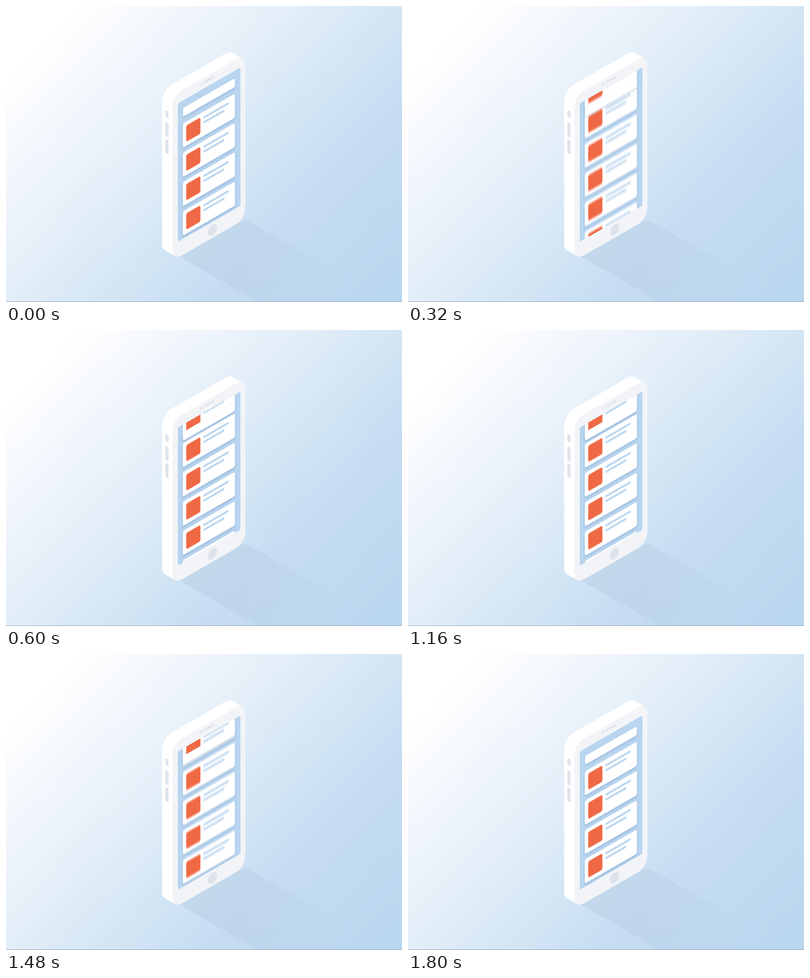
Recreate the animation shown at these times as an HTML page with a canvas. Size 800 by 600 pixels, loop 2.48 s.

```html
<!DOCTYPE html>
<html lang="en">
<head>
<meta charset="utf-8">
<title>Isometric phone scroll</title>
<style>
  html, body { margin: 0; width: 100%; height: 100%; overflow: hidden; }
  canvas { display: block; }
</style>
</head>
<body>
<canvas id="stage" width="800" height="600"></canvas>
<script>
const ctx = document.getElementById('stage').getContext('2d');
ctx.imageSmoothingQuality = 'high';

const LOOP = 2480, STEP = 40;
const COS = Math.sqrt(3) / 2;
const BLUE = '#b9d5ef', ORANGE = '#f06945', FACE = '#f2f4f7', DETAIL = '#dfe3ea';
const SCREEN = { w: 146, h: 280 };
const CARD = { x: 11.8, y: 46.6, w: 121.5, h: 49, pitch: 59.33, count: 8 };
const SCROLL = 2 * CARD.pitch + 9;
const DEPTH = 24;
const SHUTTER = 20, SAMPLES = 10;

function box(c, color, x, y, w, h, r = 0) {
  c.fillStyle = color;
  c.beginPath();
  c.roundRect(x, y, w, h, r);
  c.fill();
}

// Shadow lengths ignore the transform, so they take the scale explicitly.
function raisedBox(c, scale, ...shape) {
  c.save();
  c.shadowColor = 'rgba(60, 100, 160, .24)';
  c.shadowOffsetY = 3 * scale;
  c.shadowBlur = 5 * scale;
  box(c, '#fff', ...shape);
  c.restore();
}

function makeList(scale) {
  const list = document.createElement('canvas');
  list.width = SCREEN.w * scale;
  list.height = (CARD.y + CARD.pitch * CARD.count) * scale;
  const c = list.getContext('2d');
  c.scale(scale, scale);
  box(c, BLUE, 0, 0, SCREEN.w, list.height);
  for (let i = 0; i < CARD.count; i++) {
    const y = CARD.y + i * CARD.pitch;
    raisedBox(c, scale, CARD.x, y, CARD.w, CARD.h, 4);
    box(c, ORANGE, CARD.x + 8, y + 8, 33, 33, 3.5);
    box(c, BLUE, 60, y + 9.9, 58.5, 4.4);
    box(c, BLUE, 60, y + 19.8, 48.5, 4.4);
  }
  return { image: list, height: list.height / scale };
}
const list = makeList(3);

const background = ctx.createLinearGradient(0, 0, 700, 700);
[[0, '#fff'], [.1, '#fff'], [.28, '#f0f5fc'], [.46, '#dfecf7'],
 [.6, '#d0e4f4'], [.72, '#c6dcf2'], [1, '#b7d6ee']]
  .forEach(([at, color]) => background.addColorStop(at, color));

const floorShadow = ctx.createLinearGradient(417, 470, 655, 607);
floorShadow.addColorStop(0, 'rgba(140, 165, 190, .17)');
floorShadow.addColorStop(1, 'rgba(140, 165, 190, 0)');

// Units on the phone's front, measured from the screen's top left corner.
function frontPlane(depth = 0) {
  ctx.setTransform(COS, -.5, 0, 1, 347 - depth * COS, 197.8 - depth / 2);
}

function drawScene() {
  ctx.resetTransform();
  box(ctx, background, 0, 0, 800, 600);
  ctx.fillStyle = floorShadow;
  ctx.beginPath();
  ctx.moveTo(350, 508);
  ctx.lineTo(483, 432);
  ctx.lineTo(783, 605);
  ctx.lineTo(650, 681);
  ctx.fill();
  box(ctx, '#94a1ad', 0, 599, 800, 1);
}

function drawPhone() {
  const body = [-12.4, -21.4, 170, 333.8, 22];
  for (let depth = DEPTH; depth > 0; depth -= .5) {
    frontPlane(depth);
    box(ctx, '#fff', ...body);
  }
  frontPlane();
  box(ctx, FACE, ...body);
  box(ctx, DETAIL, 51, -14.2, 6, 4, 1);
  box(ctx, DETAIL, 60.6, -14.2, 24.3, 4, 1);
  box(ctx, '#dde3ea', 69.7 + 11.5 - 10.7, 296.6 - 10.7, 21.4, 21.4, 10.7);

  ctx.setTransform(COS, .5, 0, 1, 322, 0);
  box(ctx, DETAIL, 0, 210.5, 7.5, 14, 2);
  box(ctx, DETAIL, 0, 235, 7.5, 28.5, 2);
  box(ctx, DETAIL, 0, 269, 7.5, 28.5, 2);
}

function ease(t, start, end) {
  const p = Math.min(1, Math.max(0, (t - start) / (end - start)));
  return p * p * (3 - 2 * p);
}

function scrollAt(t) {
  return SCROLL * (ease(t, 0, 560) - ease(t, 1120, 1800));
}

function drawScreen(t) {
  frontPlane();
  ctx.save();
  ctx.beginPath();
  ctx.roundRect(0, 0, SCREEN.w, SCREEN.h, 4);
  ctx.fillStyle = BLUE;
  ctx.fill();
  ctx.clip();
  // Averaging equal samples across the shutter gives the motion blur.
  const moving = scrollAt(t - SHUTTER) !== scrollAt(t + SHUTTER);
  const samples = moving ? SAMPLES : 1;
  for (let i = 0; i < samples; i++) {
    const offset = ((i + .5) / samples - .5) * SHUTTER;
    ctx.globalAlpha = 1 / (i + 1);
    ctx.drawImage(list.image, 0, -scrollAt(t + offset), SCREEN.w, list.height);
  }
  ctx.globalAlpha = 1;
  raisedBox(ctx, 1, 12.1, 15.2, 121.2, 17.8, 4);
  ctx.restore();
}

function render() {
  const t = Math.floor((performance.now() + 1) / STEP) * STEP % LOOP;
  drawScene();
  drawPhone();
  drawScreen(t);
  requestAnimationFrame(render);
}
render();
</script>
</body>
</html>
```
